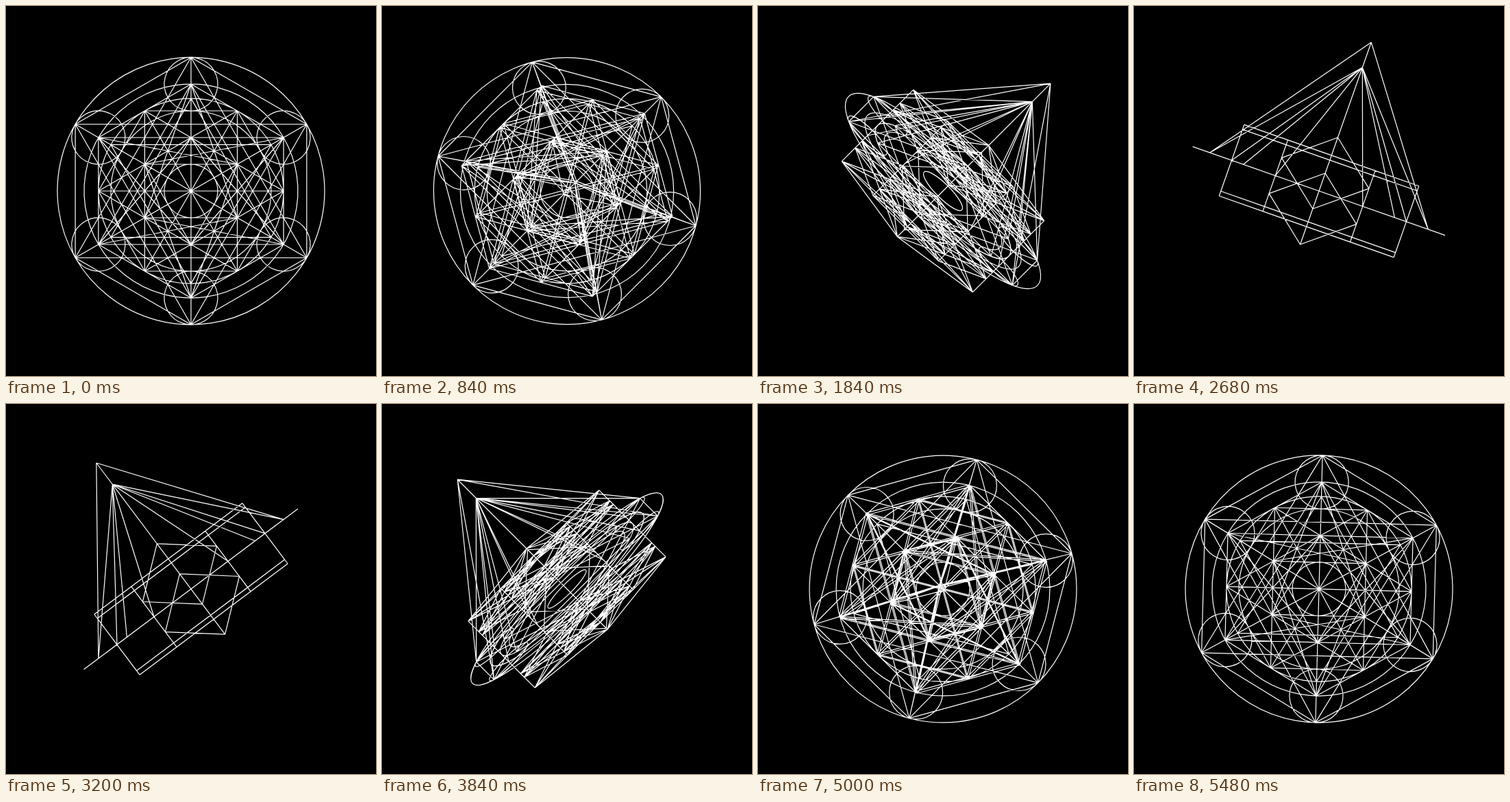
An HTML page with a canvas that plays this animation: 540x540 px, repeating every 5.52 s.

```html
<!DOCTYPE html>
<html lang="en">
<head>
<meta charset="utf-8">
<title>Turning geometric figure</title>
<style>
  html, body { margin: 0; width: 100%; height: 100%; overflow: hidden; background: #000; }
  canvas { display: block; width: 540px; height: 540px; }
</style>
</head>
<body>
<canvas id="stage" width="540" height="540"></canvas>
<script>
const ctx = document.getElementById('stage').getContext('2d');
const RAD = Math.PI / 180;
const UNIT = 39;
const STEP = 40, STEPS = 138;
const WIDE = UNIT * 2 * Math.sqrt(3);
const LAYER = UNIT * Math.SQRT2;
const INNER_LAYER = WIDE / Math.sqrt(8);
const PEAK = WIDE * Math.SQRT2;

// Points are [x, y, z]: y up, z towards the viewer.
const hexagon = (r, z = 0, turn = 30) => Array.from({ length: 6 }, (_, i) => {
  const a = (turn + i * 60) * RAD;
  return [r * Math.cos(a), r * Math.sin(a), z];
});

const lines = [];
const join = (p, q) => lines.push([p, q]);
const skip = (ring, n) => ring.forEach((p, i) => join(p, ring[(i + n) % 6]));
const fan = (top, ring) => ring.forEach(p => join(top, p));

// Joins all points of a layer; lines through the centre are optional.
function web(points, crossing) {
  points.forEach((p, i) => {
    for (let j = i + 1; j < points.length; j++) {
      if (crossing || (j - i) % 3) join(p, points[j]);
    }
  });
}

// Two equal webs, one above the other, tied at their corners.
function slab(radii, z, turn, crossing) {
  const layer = h => radii.flatMap(r => hexagon(r, h, turn));
  const front = layer(z), back = layer(-z);
  web(front, crossing);
  web(back, crossing);
  front.forEach((p, i) => join(p, back[i]));
}

function cube(r) {
  const h = r / Math.sqrt(8);
  const ring = hexagon(r).map(([x, y], i) => [x, y, i % 2 ? h : -h]);
  skip(ring, 1);
  ring.forEach((p, i) => join(p, [0, 0, i % 2 ? 3 * h : -3 * h]));
}

const rim = hexagon(5 * UNIT);
skip(rim, 1);
skip(rim, 2);
skip(hexagon(WIDE), 2);

slab([4 * UNIT, 2 * UNIT], LAYER, 30, false);
slab([WIDE], INNER_LAYER, 0, true);
cube(2 * UNIT);

// Two nested pyramids.
const tip = [0, 0, PEAK + UNIT], peak = [0, 0, PEAK];
fan(tip, rim);
join(tip, [0, 0, 0]);
for (const r of [5 * UNIT, 4 * UNIT, WIDE, 2 * UNIT]) fan(peak, hexagon(r));

const circles = [5 * UNIT, 4 * UNIT, WIDE, 3 * UNIT, UNIT].map(r => [[0, 0, 0], r])
  .concat(hexagon(4 * UNIT).map(p => [p, UNIT]));

function ease(n, from, to) {
  const x = Math.min(1, Math.max(0, (n - from) / (to - from)));
  return x * x * (3 - 2 * x);
}

const spinAt = n => 75 - 30 * ease(n, -15, 15) - 90 * ease(n, 57.1, 85.2) - 30 * ease(n, 123, 153);
const tiltAt = n => 90 * (ease(n, 15, 57) - ease(n, 87, 128.6));

function draw(n) {
  const spin = spinAt(n) * RAD, tilt = tiltAt(n) * RAD;
  const c = Math.cos(tilt), s = Math.sin(tilt);
  const flat = ([x, y, z]) => [x, -(y * c + z * s)];

  ctx.setTransform(1, 0, 0, 1, 0, 0);
  ctx.fillStyle = '#000';
  ctx.fillRect(0, 0, 540, 540);
  ctx.translate(270, 270);
  ctx.rotate(spin);
  ctx.strokeStyle = '#fff';
  ctx.lineWidth = 1.2;

  ctx.beginPath();
  for (const [p, q] of lines) {
    ctx.moveTo(...flat(p));
    ctx.lineTo(...flat(q));
  }
  for (const [p, r] of circles) {
    const [x, y] = flat(p);
    ctx.moveTo(x + r, y);
    ctx.ellipse(x, y, r, r * Math.abs(c), 0, 0, 2 * Math.PI);
  }
  ctx.stroke();
}

const start = performance.now();
function tick() {
  const time = Math.max(0, performance.now() - start);
  draw(Math.floor(time / STEP) % STEPS);
  requestAnimationFrame(tick);
}
tick();
</script>
</body>
</html>
```
